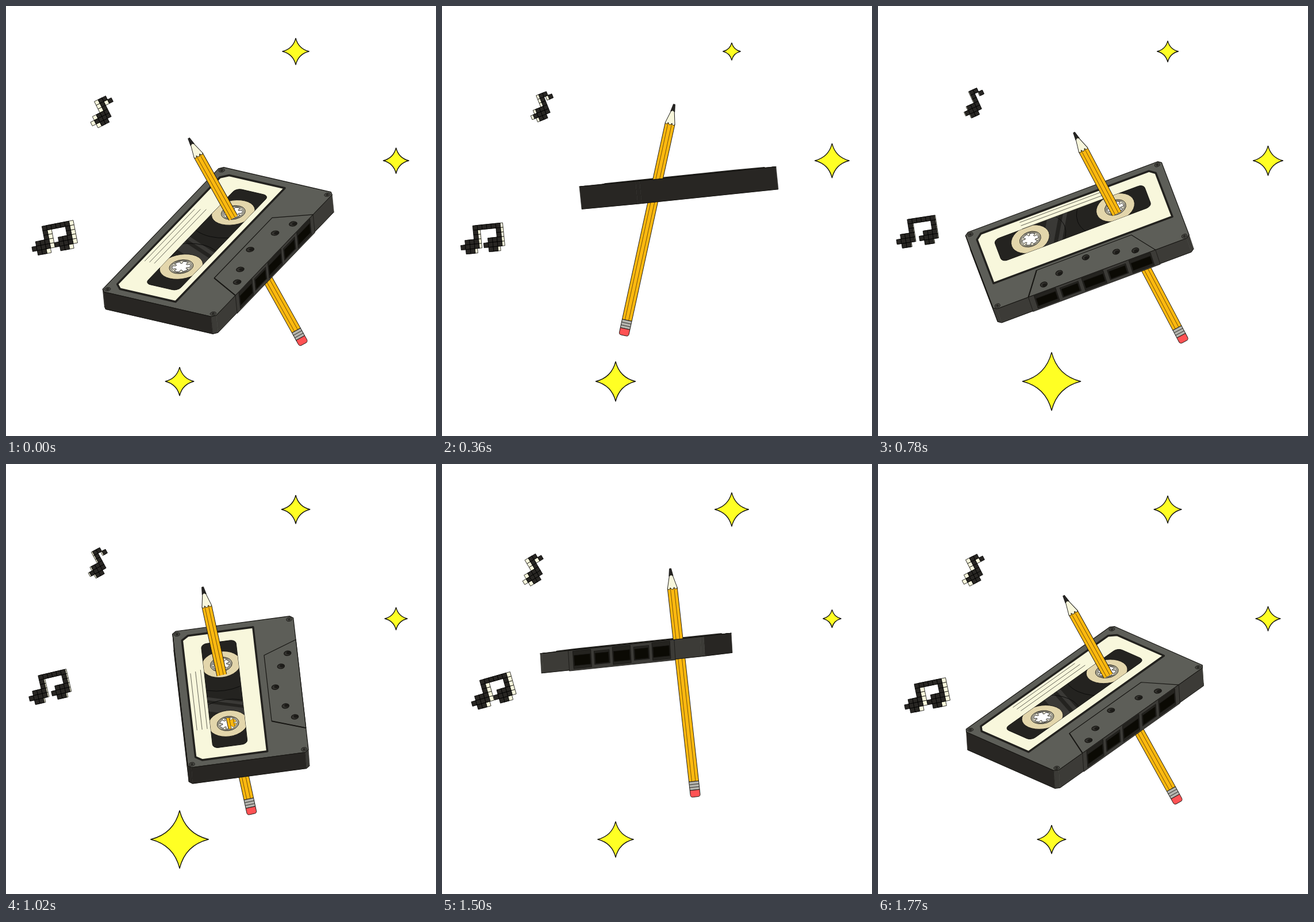
An HTML page with a canvas for the animation above (1800 ms loop, 748 by 748 pixels).

```html
<!DOCTYPE html>
<html lang="en">
<head>
<meta charset="utf-8">
<title>Cassette on a pencil</title>
<style>
html, body { margin: 0; height: 100%; overflow: hidden; background: #fff; }
canvas { display: block; width: 100vw; height: 100vh; }
</style>
</head>
<body>
<canvas id="stage" width="748" height="748"></canvas>
<script>
const ctx = document.getElementById('stage').getContext('2d');
const LOOP = 1800, SPIN = 900, STEP = 30;
const INK = '#171613', DARK = '#282623', CREAM = '#f8f7dc', GREY = '#5d5e58', SIDE = '#3c3b37';
const HUB_CUT = 0.388;

// time, turn, ground x axis, ground depth axis, centre, thickness, pencil tip, pencil end, label shift
const POSES = [
  [0, 53, 1.089, -.187, -.104, -.605, 367.8, 410.5, 3, 30, 318, 230, 518, 588, 6],
  [120, 90, .99, -.132, -.075, -.651, 408, 396.3, 2, 28, 342, 214, 428, 609, -3],
  [360, 216, .83, -.0835, 0, -.004, 410, 297, 4, 39, 404, 171, 316, 573, 0],
  [600, 343, .817, -.0866, 0, -.004, 337, 312, 2, 34, 397, 182, 441, 579, 0],
  [780, 360, .937, -.349, -.239, -.629, 346.8, 398.8, 8, 24, 341, 220, 533, 584, -8],
  [870, 402.5, 1.037, -.145, -.082, -.588, 358.8, 408, 2, 31, 323, 229, 523, 589, 3]
];

function poseKey(i) {
  const n = POSES.length, turn = Math.floor(i / n);
  return POSES[i - turn * n].map((v, j) => v + turn * (j === 0 ? SPIN : j === 1 ? 360 : 0));
}

// Smooth periodic curve through the poses
function poseAt(t) {
  let i = POSES.length - 1;
  while (POSES[i][0] > t) i--;
  const [a, b, c, d] = [-1, 0, 1, 2].map(k => poseKey(i + k));
  const h = c[0] - b[0], s = (t - b[0]) / h, s2 = s * s, s3 = s2 * s;
  return b.map((v, j) => {
    const m0 = (c[j] - a[j]) / (c[0] - a[0]) * h, m1 = (d[j] - b[j]) / (d[0] - b[0]) * h;
    return v * (2 * s3 - 3 * s2 + 1) + m0 * (s3 - 2 * s2 + s) + c[j] * (3 * s2 - 2 * s3) + m1 * (s3 - s2);
  });
}

const wave = (t, mid, amp, peak) => mid + amp * Math.cos((t - peak) / LOOP * 2 * Math.PI);

function paint(fill, line, width = 1) {
  if (fill) { ctx.fillStyle = fill; ctx.fill(); }
  if (line) { ctx.strokeStyle = line; ctx.lineWidth = width; ctx.stroke(); }
}

function poly(points, close = true) {
  points.forEach(([x, y], i) => i ? ctx.lineTo(x, y) : ctx.moveTo(x, y));
  if (close) ctx.closePath();
}

function shape(points, fill, line, width) {
  ctx.beginPath();
  poly(points);
  paint(fill, line, width);
}

function star(x, y, r) {
  const c = r * .2;
  ctx.beginPath();
  ctx.moveTo(x, y - r);
  ctx.quadraticCurveTo(x + c, y - c, x + r, y);
  ctx.quadraticCurveTo(x + c, y + c, x, y + r);
  ctx.quadraticCurveTo(x - c, y + c, x - r, y);
  ctx.quadraticCurveTo(x - c, y - c, x, y - r);
  paint('#ffff24', INK, 1.4);
}

const SINGLE = ['...##.', '...#.#', '...#..', '.###..', '####..', '.##...'];
const DOUBLE = ['...######', '...#....#', '...#....#', '.###..###', '####.####', '.##...##.'];

function note(rows, x, y, angle, cell, midCol, depth) {
  ctx.save();
  ctx.translate(x, y);
  ctx.rotate(angle * Math.PI / 180);
  for (const [shift, fill, line] of [[depth, CREAM, INK], [0, DARK, '#000']])
    rows.forEach((row, r) => [...row].forEach((ch, c) => {
      if (ch !== '#') return;
      ctx.beginPath();
      ctx.rect((c - midCol) * cell + shift, (r - 3) * cell, cell, cell);
      paint(fill, line, .8);
    }));
  ctx.restore();
}

function pencil(p, from, to) {
  const [tx, ty, ex, ey] = p, len = Math.hypot(ex - tx, ey - ty), w = 8.5;
  ctx.save();
  ctx.translate(tx, ty);
  ctx.rotate(Math.atan2(ey - ty, ex - tx));
  ctx.beginPath();
  ctx.rect(from * len - (from ? 0 : 5), -15, (to - from) * len + 5, 30);
  ctx.clip();
  shape([[34, -w], [len - 27, -w], [len - 27, w], [34, w]], '#ffb90f', INK, .9);
  ctx.beginPath();
  for (const y of [-3, 3.5]) poly([[34, y], [len - 27, y]], false);
  paint(null, '#5a420c', .8);
  ctx.beginPath();
  ctx.moveTo(1, 0);
  ctx.lineTo(34, -w);
  ctx.quadraticCurveTo(39, -6, 33, -3);
  ctx.quadraticCurveTo(40, 0, 33, 3.5);
  ctx.quadraticCurveTo(39, 6, 34, w);
  ctx.closePath();
  paint(CREAM, INK, .9);
  shape([[0, -1.5], [13, -3.6], [11, 0], [13, 3.6], [0, 1.5]], '#262524', INK, .8);
  shape([[len - 27, -w], [len - 12, -w], [len - 12, w], [len - 27, w]], '#b4b4ae', INK, .9);
  ctx.beginPath();
  for (const x of [22, 17]) poly([[len - x, -w], [len - x, w]], false);
  paint(null, INK, .8);
  ctx.beginPath();
  ctx.roundRect(len - 12, -w, 12, 2 * w, [0, 4, 4, 0]);
  paint('#ff5254', INK, .9);
  ctx.restore();
}

// Outline of the body with cut corners, clockwise from the upper left
const W = 182, H = 106, CUT = 6;
const BODY = [[-W + CUT, -H], [W - CUT, -H], [W, -H + CUT], [W, H - CUT],
  [W - CUT, H], [-W + CUT, H], [-W, H - CUT], [-W, -H + CUT]];

function cassette(pose) {
  const [, turn, gx, gy, dx, dy, cx, cy, tx, ty] = pose;
  const rod = pose.slice(10, 14), shift = pose[14];
  const co = Math.cos(turn * Math.PI / 180), si = Math.sin(turn * Math.PI / 180);
  const ux = gx * co + dx * si, uy = gy * co + dy * si;
  const vx = gx * si - dx * co, vy = gy * si - dy * co;
  const at = (x, y, z = 0) => [cx + ux * x + vx * y + tx * z, cy + uy * x + vy * y + ty * z];

  // Builds a path on the face, leaving line widths undistorted
  function trace(build) {
    ctx.save();
    ctx.transform(ux, uy, vx, vy, cx, cy);
    ctx.beginPath();
    build();
    ctx.restore();
  }
  const face = (build, fill, line, width) => { trace(build); paint(fill, line, width); };
  const disc = (x, y, r, fill, line, width) => face(() => ctx.arc(x, y, r, 0, 7), fill, line, width);
  const gear = (x, y) => () => {
    for (let k = 0; k < 6; k++) {
      const a = k * Math.PI / 3;
      ctx.arc(x, y, 14.5, a - .35, a + .35);
      ctx.arc(x, y, 9.5, a + .4, a + .65);
    }
    ctx.closePath();
  };

  function front() {
    face(() => poly(BODY), GREY, INK, 1.2);
    const low = 31 - shift * 1.2, mid = shift - 25;
    face(() => poly([[-156, -91], [156, -91], [166, -80], [166, low], [-166, low], [-166, -80]]), CREAM, '#22211e', 3.5);
    face(() => [-83, -74, -65].forEach((y, i) => poly([[-86, y], [66 + i * 3, y]], false)), null, '#55544a', .9);
    const pane = () => ctx.roundRect(-139, mid - 31, 278, 61, 10);
    face(pane, '#242320', INK, 1);
    ctx.save();
    trace(pane);
    ctx.clip();
    for (const [x, w] of [[-40, 22], [-10, 8]])
      face(() => poly([[x, mid - 32], [x + w, mid - 32], [x + w - 26, mid + 32], [x - 26, mid + 32]]), '#3a3936');
    disc(-79, mid, 64, null, '#0b0b09', .9);
    disc(79, mid, 70, null, '#0b0b09', .9);
    for (const x of [-79, 79]) disc(x, mid, 34.5, '#e3d6ab', INK, .9);
    ctx.restore();
    for (const x of [-79, 79]) {
      disc(x, mid, 19, '#c9c5b1', INK, 1);
      disc(x, mid, 16.5, '#efebd8', INK, .8);
      face(gear(x, mid), '#fff', INK, .9);
    }
    ctx.save();
    trace(gear(-79, mid));
    ctx.clip();
    pencil(rod, HUB_CUT, 1);
    ctx.restore();
    face(() => poly([[-118, H], [-88, 48], [88, 48], [118, H]]), GREY, INK, 1.2);
    face(() => poly([[-88, 48], [-118, H]], false), null, INK, 2);
    for (const [x, y] of [[-85, 89], [-53, 75], [0, 61], [53, 75], [85, 89]]) {
      disc(x, y, 6.2, '#34332f', INK, 1.2);
      disc(x + 1, y + 2, 4, '#1c1b18');
    }
    for (const x of [-173.5, 173.5]) for (const y of [-98.5, 98.5]) {
      disc(x, y, 4.8, '#4c4c47', INK, .9);
      disc(x, y, 2, '#30302c', INK, .7);
    }
  }

  function sides() {
    BODY.forEach(([x0, y0], i) => {
      const [x1, y1] = BODY[(i + 1) % BODY.length];
      const p = at(x0, y0), q = at(x1, y1);
      if ((q[0] - p[0]) * ty - (q[1] - p[1]) * tx >= 0) return;
      const open = i === 4, fill = open || i === 3 || i === 5 ? SIDE : DARK;
      shape([p, q, at(x1, y1, 1), at(x0, y0, 1)], fill, fill, .6);
      ctx.beginPath();
      poly([p, q], false);
      poly([at(x0, y0, 1), at(x1, y1, 1)], false);
      paint(null, INK, 1);
      if (open) openings();
    });
  }

  function openings() {
    const panel = (x0, x1, z0, z1, fill) =>
      shape([at(x0, H, z0), at(x1, H, z0), at(x1, H, z1), at(x0, H, z1)], fill, INK, .8);
    panel(-118, 118, 0, 1.04, SIDE);
    [-88, -44, 0, 44, 88].forEach((x, i) => {
      const w = i % 2 ? 17 : 20, z = i % 2 ? .16 : .05;
      panel(x - w, x + w, z, 1 - z, '#24231f');
      panel(x - w + 2, x + w - 2, .27, .8, '#0b0a04');
    });
  }

  if (ux * vy - uy * vx > 0) {
    pencil(rod, HUB_CUT, 1);
    front();
    pencil(rod, 0, HUB_CUT);
  } else {
    pencil(rod, 0, HUB_CUT);
    shape(BODY.map(([x, y]) => at(x, y, 1)), DARK, INK, 1);
    pencil(rod, HUB_CUT, 1);
  }
  sides();
}

function draw(t) {
  ctx.fillStyle = '#fff';
  ctx.fillRect(0, 0, 748, 748);
  star(504, 79, wave(t, 22.3, 7.8, 1380));
  star(678.5, 269, wave(t, 22.5, 7.8, 460));
  star(302, 653, wave(t, 38.2, 13.4, 890));
  const depth = wave(t, 4.5, 3.2, 1700);
  note(SINGLE, wave(t, 167, 9, 350), wave(t, 176, 7.5, 1650), wave(t, -26.5, 5, 450), 7.3, 3, -depth);
  note(DOUBLE, wave(t, 74, 9.5, 1500), wave(t, 397.5, 9, 190), wave(t, -11, 5.5, 450), 8, 4.5, depth);
  cassette(poseAt(t % SPIN));
}

ctx.lineJoin = 'round';
const start = performance.now();
function tick() {
  // The small lead makes up for the delay until the picture is shown
  const step = Math.floor((performance.now() - start) / STEP + .4);
  draw(step * STEP % LOOP);
  requestAnimationFrame(tick);
}
tick();
</script>
</body>
</html>
```
